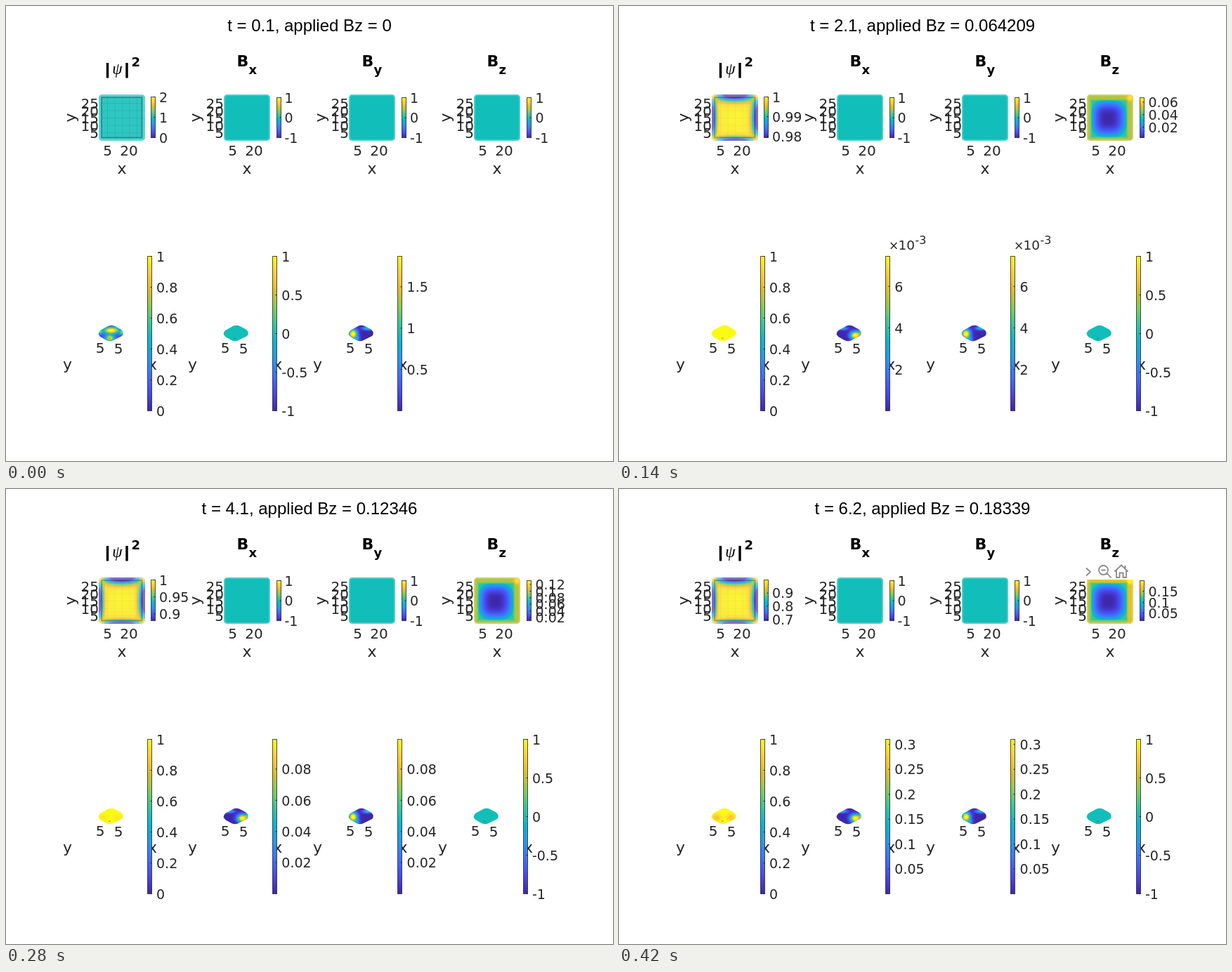
Animation of 864x648 px, one loop 0.49 s. Source, as an HTML page with a canvas:

```html
<!DOCTYPE html>
<html>
<head>
<meta charset="utf-8">
<style>
  html, body { margin: 0; width: 100%; height: 100%; overflow: hidden; background: #fff; }
  canvas { display: block; }
</style>
</head>
<body>
<canvas id="stage" width="864" height="648"></canvas>
<script>
const ctx = document.getElementById('stage').getContext('2d');
const STEP = 70, INK = '#262626';
const SANS = '"DejaVu Sans", Verdana, sans-serif';
const PARULA = ['3e26a8', '4747eb', '3e6fff', '2797eb', '08b5d0',
                '31c69f', '81cc59', 'dcbd29', 'fdcf30', 'f9fb15']
  .map(h => [0, 2, 4].map(i => parseInt(h.substr(i, 2), 16)));
const TEAL = '#12beb9';

// Colour bar ranges: [min, max, tick step, power of ten]
const UNIT = [0, 1, .2], SIGNED = [-1, 1, .5], FLAT = [-1, 1, 1];
const above0 = (max, step, power) => [max / 1e4, max, step, power];
const MILLI = above0(7.45, 2, '-3');
const STATES = [
  { title: 't = 0.1, applied Bz = 0', psi: [0, 2, 1], bz: FLAT, bx3: SIGNED, by3: above0(1.868, .5) },
  { title: 't = 1.1, applied Bz = 0.034076', psi: [.99747, 1, .001], bz: [.0008, .0342, .01], bx3: SIGNED },
  { title: 't = 2.1, applied Bz = 0.064209', psi: [.9793, 1, .01], bz: [.0031, .0673, .02], bx3: MILLI },
  { title: 't = 3.1, applied Bz = 0.094017', psi: [.9407, 1, .05], bz: [.0068, .0995, .02], bx3: above0(.0397, .01) },
  { title: 't = 4.1, applied Bz = 0.12346', psi: [.88, 1, .05], bz: [.0104, .1317, .02], bx3: above0(.0991, .02) },
  { title: 't = 5.1, applied Bz = 0.15239', psi: [.798, 1, .1], bz: [.0145, .1645, .05], bx3: above0(.1876, .05) },
  { title: 't = 6.2, applied Bz = 0.18339', psi: [.69, .9999, .1], bz: [.016, .199, .05], bx3: above0(.3103, .05) },
];

const clamp = v => Math.max(0, Math.min(1, v));
const gauss = (x, y, cx, cy, sx, sy) => Math.exp(-(((x - cx) / sx) ** 2) - ((y - cy) / sy) ** 2);

function parula(v) {
  const p = clamp(v) * 9, i = Math.min(8, Math.floor(p)), f = p - i;
  return `rgb(${PARULA[i].map((c, k) => Math.round(c + (PARULA[i + 1][k] - c) * f))})`;
}

function text(s, x, y, size, align = 'left', weight = '', color = INK, family = SANS) {
  ctx.font = `${weight} ${size}px ${family}`;
  ctx.textAlign = align;
  ctx.fillStyle = color;
  ctx.fillText(s, x, y);
}

// Fills a path with a scalar field given in local coordinates
function field(path, x0, y0, w, h, f) {
  ctx.save();
  ctx.clip(path);
  for (let y = 0; y < h; y++) {
    for (let x = 0; x < w; x++) {
      ctx.fillStyle = parula(f(x + .5, y + .5));
      ctx.fillRect(x0 + x, y0 + y, 1, 1);
    }
  }
  ctx.restore();
}

function colorbar(x, y, w, h, [min, max, step, power], labelX) {
  const grad = ctx.createLinearGradient(0, y + h, 0, y);
  for (let i = 0; i < 10; i++) grad.addColorStop(i / 9, parula(i / 9));
  ctx.fillStyle = grad;
  ctx.fillRect(x, y, w, h);
  ctx.strokeStyle = 'rgba(38,38,38,.8)';
  ctx.lineWidth = 1;
  ctx.strokeRect(x, y, w, h);
  const last = Math.floor(max / step + 1e-6);
  for (let k = Math.ceil(min / step - 1e-6); k <= last; k++) {
    const v = k * step, ty = y + h * (max - v) / (max - min);
    ctx.fillStyle = INK;
    ctx.fillRect(x + w - 2, ty - .5, 2, 1);
    text(String(+v.toFixed(4)), labelX, ty + 7.2, 19);
  }
  if (power) {
    text('×', x + 4.5, 347, 17);
    text('10', x + 18, 347, 18.5);
    text(power, x + 42, 339, 16);
  }
}

// Order parameter: depleted near the middle of each side
function psiField(n) {
  const k = n === 1 ? .85 : 1;
  const side = (depth, along, w) => {
    const middle = clamp(1 - (along / 29) ** 2);
    return middle * (1.05 * Math.exp(-((depth / (w * k)) ** 2)) + .16 * k * Math.exp(-depth / 8));
  };
  return (x, y) => {
    const u = x - 33, v = y - 33;
    const loss = side(x, v, 5.5) + side(66 - x, v, 8) + side(y, u, 9) + side(66 - y, u, 4.5);
    const corner = .13 * clamp((Math.max(Math.abs(u), Math.abs(v)) - 23) / 6);
    return .985 - loss - corner;
  };
}

// Out-of-plane field: screened in the middle, strong on the rim
function bzField(n) {
  return (x, y) => {
    const u = Math.abs(x - 30) / (x < 30 ? 24 : 27);
    const v = Math.abs(y - 34) / (y < 34 ? 26 : 27);
    const r = (u ** 3 + v ** 3) ** (1 / 3);
    const rim = clamp((Math.max(u, v) - .94) / .14);
    const inner = .48 * Math.min(1.05, r) ** 2.5;
    const spot = .24 * gauss(x, y, 61, 5, 4.5, 4.5);
    const boost = n === 6 && (y < 8 || x > 57) ? .07 : 0;
    return inner + rim * (.73 - inner + boost) + spot;
  };
}

function meshLines(n) {
  ctx.strokeStyle = n ? 'rgba(120,100,20,.06)' : 'rgba(0,100,100,.14)';
  ctx.lineWidth = 1;
  for (let i = 0; i < 5; i++) {
    const p = 12.5 + i * 10.5;
    ctx.beginPath();
    ctx.moveTo(132 + p, 130); ctx.lineTo(132 + p, 188);
    ctx.moveTo(136, 126 + p); ctx.lineTo(194, 126 + p);
    ctx.stroke();
  }
  ctx.strokeStyle = n ? 'rgba(50,50,50,.3)' : 'rgba(0,90,90,.45)';
  ctx.lineWidth = 2;
  ctx.strokeRect(136, 130, 57.5, 57.5);
}

function heading(i, x) {
  if (i) {
    text('B', x + 18.5, 86, 22, 'left', 'bold', '#000');
    text('xyz'[i - 1], x + 35.5, 97, 18, 'left', 'bold', '#000');
  } else {
    for (const cx of [144, 145, 171.5, 172.5]) text('|', cx, 97, 22, 'center', 'bold', '#000');
    text('ψ', 158.5, 97, 23, 'center', 'italic', '#000', '"Liberation Serif", Times, serif');
    text('2', 178.5, 86, 18, 'left', 'bold', '#000');
  }
}

function topPanel(i, n, state) {
  const x = 132 + 178 * i, y = 126;
  heading(i, x);
  [25, 20, 15, 10, 5].forEach((v, k) => text(v, x, 146 + k * 10.5, 20, 'right'));
  text('5', x + 12.5, 213, 20, 'center');
  text('20', x + 43, 213, 20, 'center');
  text('x', x + 33, 239, 22, 'center');
  ctx.save();
  ctx.translate(x - 33, 159);
  ctx.rotate(-Math.PI / 2);
  text('y', 0, 0, 22, 'center');
  ctx.restore();

  const slab = new Path2D();
  slab.roundRect(x, y, 66, 66, 5);
  ctx.fillStyle = TEAL;
  if (i === 0 && n) field(slab, x, y, 66, 66, psiField(n));
  else if (i === 3 && n) field(slab, x, y, 66, 66, bzField(n));
  else ctx.fill(slab);
  ctx.save();
  ctx.clip(slab);
  ctx.strokeStyle = 'rgba(255,255,255,.24)';
  ctx.lineWidth = i ? 4 : 7;
  ctx.stroke(slab);
  if (!i) {
    ctx.fillStyle = 'rgba(255,255,255,.12)';
    ctx.fill(slab);
  }
  ctx.restore();
  if (!i) meshLines(n);
  const range = i === 0 ? state.psi : i === 3 ? state.bz : FLAT;
  colorbar(i ? 207.5 + 178 * i : 206.5, i ? 130.5 : 129.5, 6, i ? 57 : 58, range, 218 + 178.5 * i);
}

function slabPath(x) {
  const p = new Path2D();
  p.moveTo(x + 2.5, 461.7);
  p.lineTo(x + 13, 456);
  p.quadraticCurveTo(x + 18, 453.4, x + 23.5, 456.2);
  p.lineTo(x + 31.5, 460.6);
  p.quadraticCurveTo(x + 37.5, 465.5, x + 33, 470);
  p.lineTo(x + 21, 476);
  p.quadraticCurveTo(x + 16, 478.6, x + 11, 476);
  p.lineTo(x + 2.5, 471.2);
  p.quadraticCurveTo(x - 3, 466.5, x + 2.5, 461.7);
  return p;
}

const slabFields = {
  psiStart: (x, y) => .12 + .95 * gauss(x, y, 18, 8, 11, 4.5) + .8 * gauss(x, y, 16, 19, 6, 4.5)
    + .5 * gauss(x, y, 2, 10, 3, 3) + .5 * gauss(x, y, 33, 11, 3, 3),
  psiLate: n => (x, y) => 1 - (n - 3) * .05 *
    (gauss(x, y, 7, 14, 6, 5) + gauss(x, y, 27, 14, 6, 5)),
  bx: (x, y) => 1.1 * gauss(x, y, 26.5, 15, 7, 5.5) + .4 * gauss(x, y, 35, 11, 4, 5)
    + .4 * gauss(x, y, 8, 5, 7, 2.5),
  by: (x, y) => 1.1 * gauss(x, y, 6, 13, 6, 6.5) + .3 * gauss(x, y, 12, 20, 4, 3)
    + .5 * gauss(x, y, 27, 5, 7, 2.5),
};

function bottomPanel(i, n, state) {
  const x = 132 + 178 * i;
  text('5', x + 2, 494.3, 20, 'center');
  text('5', x + 28, 495.3, 20, 'center');
  text('y', x - 44.5, 518, 22, 'center');
  text('x', 208.5 + 178.3 * i, 518, 22, 'center');

  const by3 = state.by3 || state.bx3;
  const range = [UNIT, state.bx3, by3, SIGNED][i];
  const slab = slabPath(x);
  const paint = f => field(slab, x - 2, 452, 40, 28, (u, v) => f(u - 2, v - 2));
  if (!i && (!n || n > 3)) paint(n ? slabFields.psiLate(n) : slabFields.psiStart);
  else if (i && range !== SIGNED) paint(i === 1 ? slabFields.bx : slabFields.by);
  else {
    ctx.fillStyle = i ? TEAL : parula(1);
    ctx.fill(slab);
  }
  ctx.fillStyle = 'rgba(50,50,30,.45)';
  ctx.fillRect(x + 14.5, 472.5, 2, 1.5);
  colorbar(Math.round(201 + 178.2 * i) + .5, 356.5, 6, 220, range, 214 + 178.3 * i);
}

function toolbar() {
  ctx.fillStyle = '#fff';
  ctx.fillRect(660, 107, 74, 22);
  ctx.strokeStyle = '#8a8a8a';
  ctx.lineWidth = 1.8;
  ctx.stroke(new Path2D('M665 112.5l6 5.5l-6 5.5'));
  ctx.stroke(new Path2D('M696 115.5a6.5 6.5 0 1 1-13 0a6.5 6.5 0 1 1 13 0M686.5 115.5h6M694.5 120l6 6.5'));
  ctx.stroke(new Path2D('M705.5 117.5l9.5-9l9.5 9M708 116v10h4.5v-6.5h5v6.5h4.5v-10M720.5 113v-4'));
}

function draw(n) {
  const state = STATES[n];
  ctx.fillStyle = '#fff';
  ctx.fillRect(0, 0, 864, 648);
  text(state.title, 432, 36, 24, 'center', '', '#000', '"Liberation Sans", Arial, sans-serif');
  for (let i = 0; i < 4; i++) {
    topPanel(i, n, state);
    if (i < 3 || n) bottomPanel(i, n, state);
  }
  if (n === 6) toolbar();
}

const start = performance.now();
let shown = -1;
function tick() {
  const n = Math.floor((performance.now() - start) / STEP) % STATES.length;
  if (n !== shown) draw(shown = n);
  requestAnimationFrame(tick);
}
tick();
</script>
</body>
</html>
```
